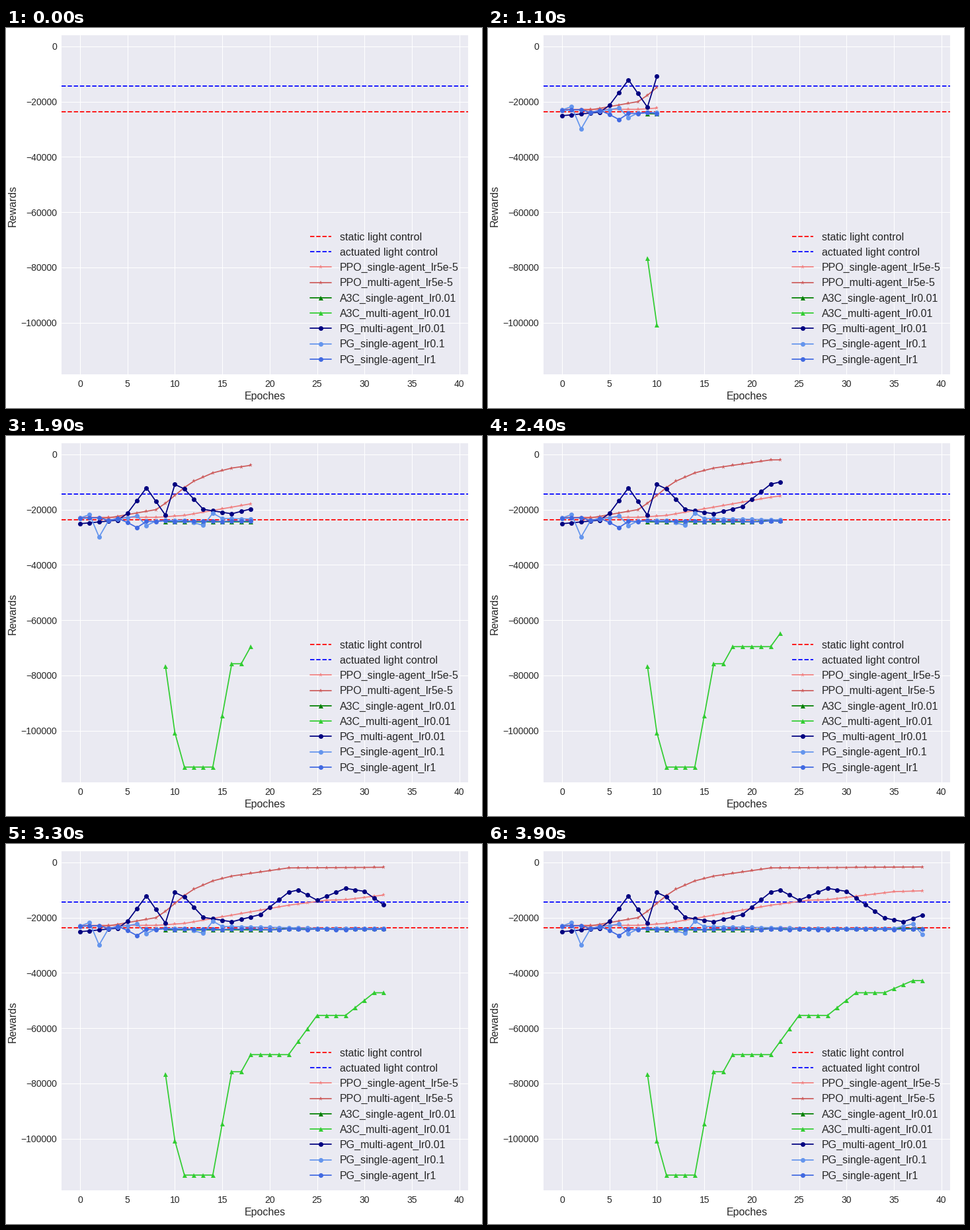
Animation, 720 px wide and 576 px high, one loop 4 s. Source, as a matplotlib script:

```python
import numpy as np
import matplotlib.pyplot as plt
from matplotlib.animation import FuncAnimation

W, H, DPI = 720, 576, 72
FRAMES, INTERVAL = 40, 100
LEFT, RIGHT, TOP, BOTTOM = 84.17, 699.17, 11, 524.5

plt.rcParams.update({
    "font.family": "Liberation Sans",
    "text.color": ".15",
    "axes.labelcolor": ".15",
    "xtick.color": ".15",
    "ytick.color": ".15",
    "axes.facecolor": "#EAEAF2",
    "axes.linewidth": 0,
    "axes.axisbelow": True,
    "axes.labelsize": 16,
    "xtick.labelsize": 14,
    "ytick.labelsize": 14,
    "xtick.major.size": 0,
    "ytick.major.size": 0,
    "xtick.major.pad": 8,
    "ytick.major.pad": 7,
    "lines.linewidth": 1.75,
    "lines.markersize": 7,
    "lines.markeredgewidth": 0,
    "lines.solid_capstyle": "round",
})

rng = np.random.default_rng(3)


def curve(*knots, start=0, jitter=0):
    """Rewards per epoch, straight between (epoch, loss in thousands) turning points."""
    x, loss = zip(*knots)
    epochs = np.arange(start, FRAMES - 1)
    noise = rng.uniform(-jitter, jitter, len(epochs))
    return epochs, -1000 * (np.interp(epochs, x, loss) + noise)


ppo_single = curve((8, 22.8), (11, 22.1), (22, 15.5), (26, 13.7), (28, 13.5),
                   (35, 10.6), (38, 10.3))
ppo_multi = curve((3, 23), (8, 20), (9, 17.7), (11, 12), (12, 9.7), (14, 6.7),
                  (16, 4.95), (22, 2), (38, 1.65))
a3c_single = curve((20, 24.4), (22, 23.9), start=9)
a3c_multi = curve((9, 76.6), (10, 100.8), (11, 113.2), (14, 113.2), (16, 75.8),
                  (17, 75.8), (18, 69.6), (22, 69.6), (25, 55.4), (28, 55.4),
                  (31, 47.2), (34, 47.2), (37, 42.8), start=9)
pg_multi = curve((0, 25.1), (4, 23.8), (5, 21.3), (7, 12.1), (9, 22), (10, 10.9),
                 (11, 12.5), (13, 19.9), (16, 21.5), (19, 18.9), (22, 10.8),
                 (23, 10), (25, 13.7), (28, 9.4), (30, 10.5), (34, 20.1),
                 (36, 21.5), (38, 19.1))
pg_mid = curve((0, 23), (1, 21.8), (2, 29.9), (3, 24), (6, 22.3), (7, 25.8),
               (8, 24.1), (11, 23.8), (13, 25.7), (14, 21.3), (15, 23.2),
               (26, 23.9), (35, 23.9), (37, 22.3), (38, 26.1))
pg_high = curve((2, 23), (3, 24), (4, 23.1), (6, 26.5), (7, 24.2), jitter=0.2)

baselines = [
    ("static light control", "red", -23690),
    ("actuated light control", "blue", -14370),
]
runs = [
    ("PPO_single-agent_lr5e-5", "lightcoral", "*", ppo_single),
    ("PPO_multi-agent_lr5e-5", "indianred", "*", ppo_multi),
    ("A3C_single-agent_lr0.01", "green", "^", a3c_single),
    ("A3C_multi-agent_lr0.01", "limegreen", "^", a3c_multi),
    ("PG_multi-agent_lr0.01", "navy", "o", pg_multi),
    ("PG_single-agent_lr0.1", "cornflowerblue", "o", pg_mid),
    ("PG_single-agent_lr1", "royalblue", "o", pg_high),
]

fig = plt.figure(figsize=(W / DPI, H / DPI), dpi=DPI, facecolor="white")
ax = fig.add_axes([LEFT / W, 1 - BOTTOM / H, (RIGHT - LEFT) / W, (BOTTOM - TOP) / H])
ax.set(xlim=(-1.95, 40.95), ylim=(-118615, 4027))
ax.set_xlabel("Epoches")
ax.set_ylabel("Rewards", labelpad=5, y=0.4965)
ax.set_xticks(range(0, 41, 5))
ax.set_yticks(range(-100000, 1, 20000))
ax.grid(color="white", linewidth=1)

for _, color, level in baselines:
    ax.axhline(level, color=color, linestyle="--")
lines = [ax.plot([], [], color=color, marker=marker)[0] for _, color, marker, _ in runs]

# Legend, laid out in pixels from the top left corner
key = fig.add_axes([0, 0, 1, 1])
key.set(xlim=(0, W), ylim=(H, 0))
key.axis("off")
rows = [(label, color, "--", "") for label, color, _ in baselines]
rows += [(label, color, "-", marker) for label, color, marker, _ in runs]
for i, (label, color, style, marker) in enumerate(rows):
    y = 315.95 + 23.25 * i
    key.plot([460.2, 492.2], [y, y], color=color, linestyle=style)
    key.plot([476.2], [y], color=color, marker=marker, linestyle="")
    key.text(505, y + 5.6, label, fontsize=16, va="baseline")


def update(frame):
    for line, (*_, (epochs, rewards)) in zip(lines, runs):
        shown = epochs < frame
        line.set_data(epochs[shown], rewards[shown])
    return lines


anim = FuncAnimation(fig, update, frames=FRAMES, interval=INTERVAL,
                     repeat=True, repeat_delay=0, blit=False)
plt.show()
```
